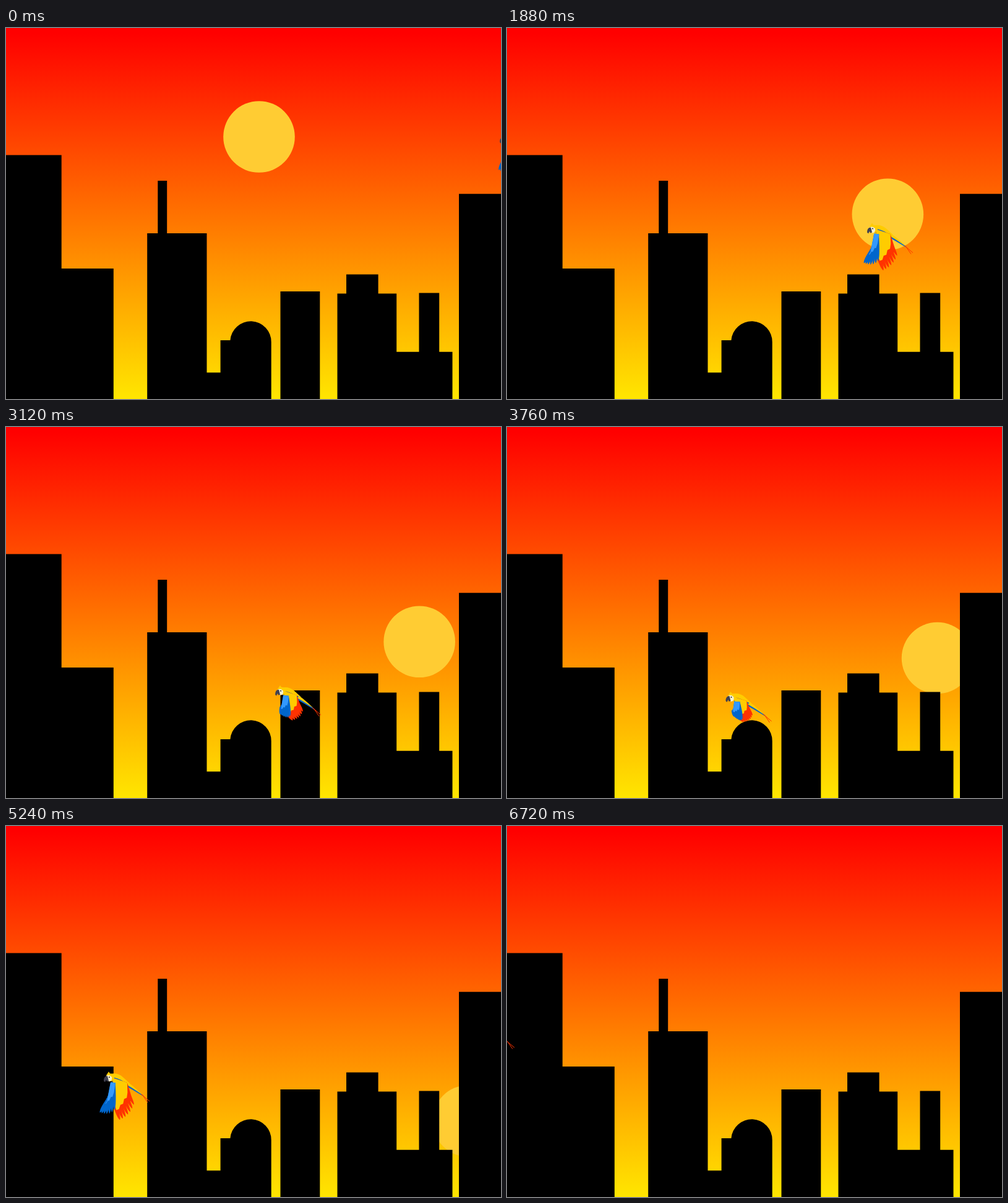
These frames come from a looping animation (800x600 px, 6760 ms). An HTML page with a canvas:

```html
<!DOCTYPE html>
<html lang="en">
<head>
<meta charset="utf-8">
<title>City sunset</title>
<style>
  html, body { margin: 0; width: 100%; height: 100%; overflow: hidden; }
  canvas { display: block; width: 800px; height: 600px; }
</style>
</head>
<body>
<canvas id="stage" width="800" height="600"></canvas>
<script>
const ctx = document.getElementById('stage').getContext('2d');
const LOOP = 6760, STEP = 40, FLAP = 660, DOWNSTROKE = 300;
const BLUE = '#0066cc', SKY_BLUE = '#3399ff', RED = '#ff3300', YELLOW = '#ffcc00';

const sky = ctx.createLinearGradient(0, 8, 0, 600);
sky.addColorStop(0, '#ff0000');
sky.addColorStop(1, '#ffe600');

const skyline = new Path2D(`M0 600V205.5H89.7V389H173.8V600H228.2V332H245.3V247H260.2V332H324.5
  V557.3H346.6V505H362.4A33.2 33.2 0 0 1 428.7 508V600H443.5V426H507.3V600H535.5V429.5H550
  V398.5H601.6V429.5H631.2V523.7H667.5V428.6H700.2V523.7H721.5V600H732V268.2H800V600Z`);

// Key points: time, x, y
const sunPath = [
  [960, 560, 255.5], [1050, 580, 270.5], [3680, 692, 368],
  [4400, 724, 419], [5240, 747, 477], [6720, 795, 539]
];
const birdPath = [
  [0, 798, 180], [960, 680, 306], [1880, 582, 327], [3120, 435, 425],
  [4400, 272, 442], [5240, 158, 409], [6720, -62, 310]
];

// Wing corners relative to the beak: front shoulder, wrist, first tip, last tip, back shoulder
const nearWing = {
  up: [[22, 0], [31, -34], [75, -47], [54, -17], [35, 0]],
  down: [[11, 5], [5, 36], [-7, 55], [17, 51], [19, 6]]
};
const farWing = {
  up: [[13, -7], [12, -31], [39, -49], [27, -18], [22, -5]],
  down: [[14, -2], [18, 44], [26, 67], [49, 42], [38, 6]]
};

const mix = (a, b, u) => a + (b - a) * u;
const between = (p, q, u) => p.map((n, i) => mix(n, q[i], u));

function along(path, t) {
  const i = Math.max(1, path.findIndex(p => p[0] >= t));
  const [t0, ...a] = path[i - 1];
  const [t1, ...b] = path[i];
  return between(a, b, (t - t0) / (t1 - t0));
}

// The sun falls with growing speed, then glides from point to point
function sunAt(t) {
  return t < 960 ? between([409, 176], [560, 255.5], (t / 960) ** 1.87) : along(sunPath, t);
}

// 0 = wings raised, 1 = wings lowered
function stroke(t) {
  const p = (t + FLAP - DOWNSTROKE) % FLAP;
  if (p < DOWNSTROKE) return Math.sin(p / DOWNSTROKE * Math.PI / 2);
  return (1 + Math.cos((p - DOWNSTROKE) / (FLAP - DOWNSTROKE) * Math.PI)) / 2;
}

function fill(color, path) {
  ctx.fillStyle = color;
  ctx.fill(path);
}

function line(color, width, d) {
  ctx.strokeStyle = color;
  ctx.lineWidth = width;
  ctx.stroke(new Path2D(d));
}

const shape = (color, d) => fill(color, new Path2D(d));
const poly = (color, points) => shape(color, `M${points.join('L')}Z`);

function disc(color, x, y, r) {
  const path = new Path2D();
  path.arc(x, y, r, 0, 7);
  fill(color, path);
}

function feather(color, root, tip, width) {
  const dx = tip[0] - root[0], dy = tip[1] - root[1];
  const k = width / Math.hypot(dx, dy);
  const side = (u, s) => [mix(root[0], tip[0], u) - dy * k * s, mix(root[1], tip[1], u) + dx * k * s];
  shape(color, `M${side(0, 1)}Q${side(0.85, 1.3)} ${tip}Q${side(0.85, -1.3)} ${side(0, -1)}Z`);
}

function wing({ up, down }, lowered, outer, inner, cover) {
  const [front, wrist, first, last, back] = up.map((p, i) => between(p, down[i], lowered));
  const count = 7;
  poly(outer, [front, wrist, between(wrist, first, 0.6), between(back, last, 0.75), back]);
  const scallops = [];
  for (let k = 0; k < count; k++) {
    const u = k / (count - 1);
    const root = between(wrist, back, u * 0.8);
    const tip = between(root, between(first, last, u), 1 + 0.6 * u * (1 - u));
    feather(outer, root, tip, 2.6);
    scallops.push(between(root, tip, cover + 0.1 * (k % 2)));
  }
  poly(inner, [front, wrist, ...scallops, back]);
}

function bird(t) {
  const lowered = stroke(t);
  const [x, y] = along(birdPath, t);
  ctx.save();
  ctx.translate(x, y + 25 * (1 - lowered));

  // Tail
  shape(BLUE, 'M30 4Q46 11 66 29Q48 18 30 8Z');
  shape(YELLOW, 'M30 -1Q46 9 62 25Q46 14 30 5Z');
  line(RED, 1, 'M60 24L74 36M62 25L71 38');

  // Body
  shape(BLUE, 'M10 -4Q22 -6 35 3L38 7Q27 10 18 7Q11 4 10 -4Z');
  shape(YELLOW, 'M10 -8Q22 -11 31 -3L42 7L32 4Q23 -2 12 -3Z');

  wing(farWing, lowered, RED, YELLOW, 0.3);
  wing(nearWing, lowered, BLUE, SKY_BLUE, 0.25);

  // Head
  shape(YELLOW, 'M4 -6L6 -9L8 -12L10 -9Q17 -9 17 -2L13 4L7 1Z');
  shape('#f5f0d0', 'M4 -5Q9 -8 13 -3Q14 3 9 4Q5 3 4 -5Z');
  shape('#404050', 'M6 -5Q0 -5 0 3L2 5L4 1L5 4L8 3Z');
  disc('#222222', 9, -3, 1);
  ctx.restore();
}

function draw(now) {
  const t = Math.floor((now % LOOP) / STEP) * STEP;
  ctx.fillStyle = sky;
  ctx.fillRect(0, 0, 800, 600);
  disc('#ffcc33', ...sunAt(t), 57.8);
  fill('#000000', skyline);
  bird(t);
}

let start;
function tick(now) {
  start ??= now;
  draw(now - start);
  requestAnimationFrame(tick);
}
draw(0);
requestAnimationFrame(tick);
</script>
</body>
</html>
```
